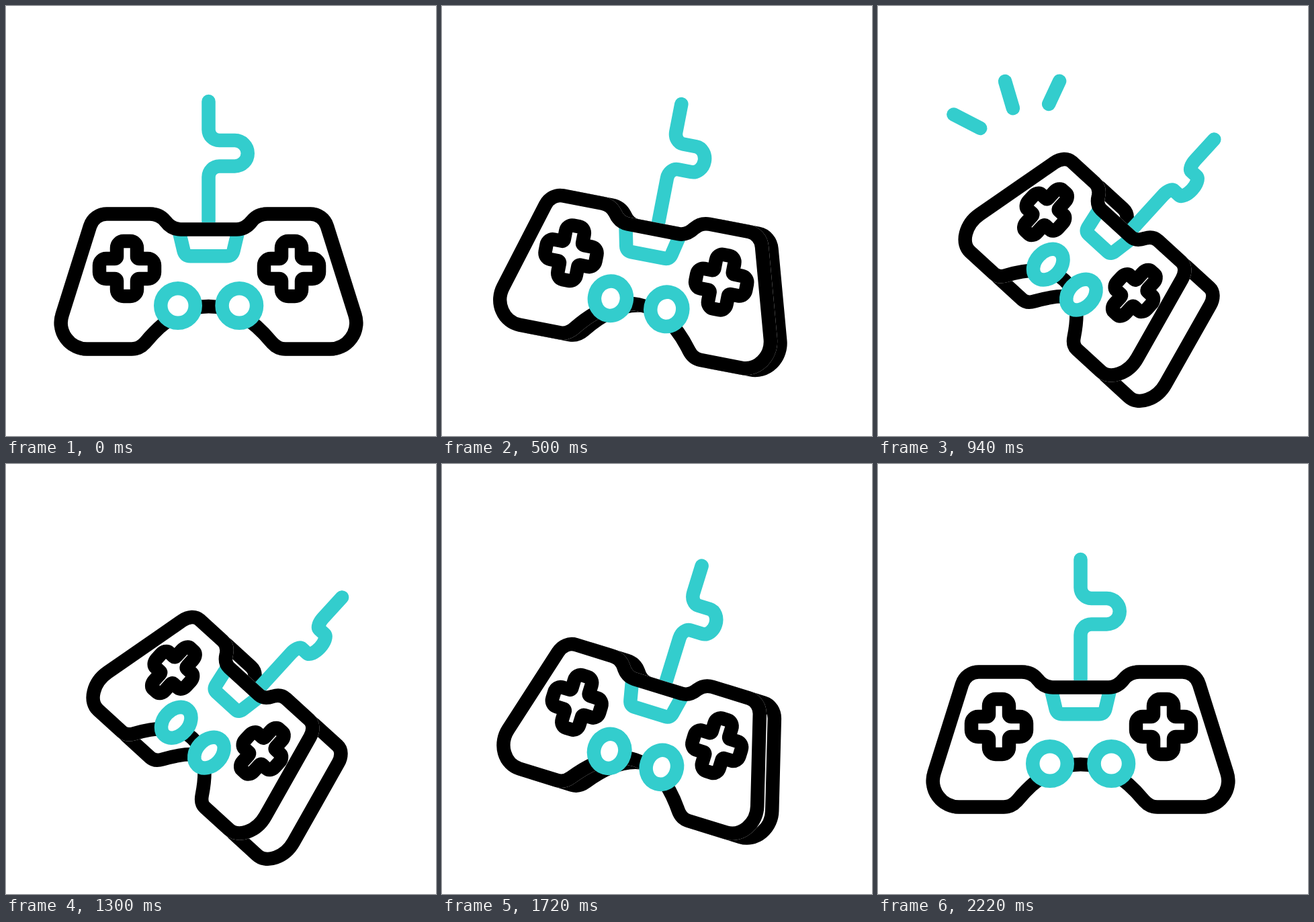
Animation, 640 px wide and 640 px high, one loop 2.4 s. Source, as an HTML page:

```html
<!DOCTYPE html>
<html lang="en">
<head>
<meta charset="utf-8">
<title>Game controller</title>
<style>
  @property --p { syntax: "<number>"; inherits: true; initial-value: 0; }

  html, body { margin: 0; width: 100%; height: 100%; overflow: hidden; background: #fff; }
  svg {
    display: block; width: 100%; height: 100%;
    fill: none; stroke: #000; stroke-width: 20.5;
    stroke-linecap: round; stroke-linejoin: round;
    animation: turn 2400ms cubic-bezier(.805, 0, .265, 1) infinite;
  }
  path, circle { vector-effect: non-scaling-stroke; }
  .teal { stroke: #33cdcd; }
  .solid { fill: #fff; }
  .mask { fill: #fff; stroke: #fff; }

  /* --p runs from 0 (facing front) to 1 (turned); each layer slides along the tilted axis */
  .layer {
    transform-origin: 301.5px 358px;
    transform:
      translateX(calc(var(--p) * 54px))
      rotate(calc(var(--p) * 43.2deg))
      translateX(calc(var(--p) * var(--slide)))
      scaleX(calc(1 - var(--p) * var(--squash)));
  }
  .back  { --slide: 34.1px; --squash: .276; }
  .cable { --slide: 0px;    --squash: .56; }
  .front { --slide: -24px;  --squash: .276; }

  @keyframes turn {
    0%, 92.5%, 100% { --p: 0; }
    46.25% { --p: 1; }
  }

  .rays path { animation: ray 2400ms linear infinite; }
  .rays { animation: show 2400ms step-end infinite; }
  @keyframes show {
    0%, 44.5% { visibility: hidden; }
    28% { visibility: visible; }
  }
  @keyframes ray {
    0%, 28% { stroke-dasharray: 0 300; stroke-dashoffset: 0; }
    33.33% { stroke-dasharray: 58 300; stroke-dashoffset: -6; }
    39.17% { stroke-dasharray: 57.2 300; stroke-dashoffset: -37.8; }
    44.5%, 100% { stroke-dasharray: 0 300; stroke-dashoffset: -100; }
  }
</style>
</head>
<body>
<svg viewBox="0 0 640 640">
  <defs>
    <path id="body" d="M150 309.5H214C224 309.5 232 314 237 320C243 328 250 332.5 260 332.5H343
      C353 332.5 360 328 366 320C371 314 379 309.5 389 309.5H453A26 26 0 0 1 477.9 327.9L519.3 459.5
      A39 39 0 0 1 482 510.5H416C407 510.5 400 506 395 500C371 471 341 447 301.5 447
      C262 447 232 471 208 500C203 506 196 510.5 187 510.5H121A39 39 0 0 1 83.7 459.5L125.1 327.9
      A26 26 0 0 1 150 309.5Z"/>
    <path id="pad" d="M-5-41H5a10 10 0 0 1 10 10V-18a3 3 0 0 0 3 3H31a10 10 0 0 1 10 10V5
      a10 10 0 0 1-10 10H18a3 3 0 0 0-3 3V31a10 10 0 0 1-10 10H-5a10 10 0 0 1-10-10V18
      a3 3 0 0 0-3-3H-31a10 10 0 0 1-10-10V-5a10 10 0 0 1 10-10H-18a3 3 0 0 0 3-3V-31
      a10 10 0 0 1 10-10Z"/>
  </defs>

  <g class="rays teal">
    <path pathLength="100" d="M179 195.6L109 159.7"/>
    <path pathLength="100" d="M209 179.4L188 108.5"/>
    <path pathLength="100" d="M243.5 169L271.5 108.7"/>
  </g>

  <g class="layer back"><use href="#body" class="solid"/></g>

  <g class="layer cable teal">
    <path d="M301.5 142V184A16 16 0 0 0 317.5 200H340.5a19.25 19.25 0 0 1 0 38.5H317.5A16 16 0 0 0 301.5 254.5V330"/>
  </g>

  <g class="layer front">
    <use href="#body" class="mask"/>
    <path class="teal" d="M257 333L264.5 364.5Q266.3 372.3 274.5 372.3H328.5Q336.7 372.3 338.5 364.5L346 333"/>
    <use href="#body"/>
    <use href="#pad" x="180" y="391"/>
    <use href="#pad" x="425" y="391"/>
    <g class="teal solid">
      <circle cx="256" cy="446" r="25.75"/>
      <circle cx="347.3" cy="446" r="25.75"/>
    </g>
  </g>
</svg>
</body>
</html>
```
